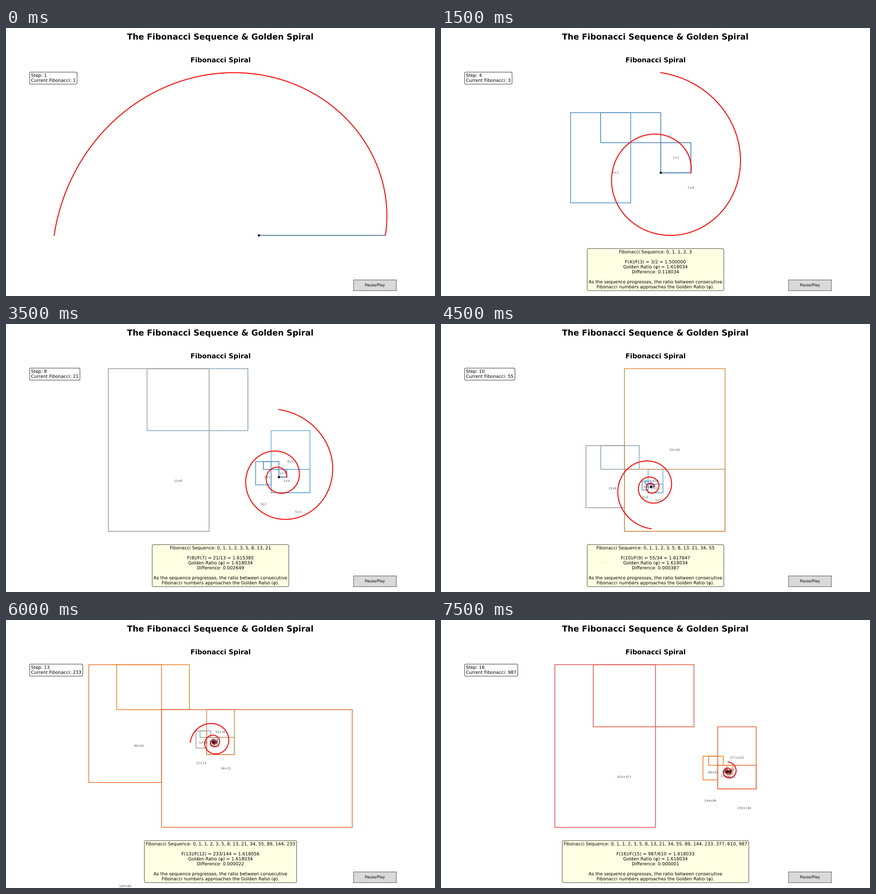
These frames come from a looping animation (947x592 px, 8000 ms). A matplotlib script:

```python
import numpy as np
import matplotlib.pyplot as plt
from matplotlib import patheffects
from matplotlib.animation import FuncAnimation
from matplotlib.colors import LinearSegmentedColormap
from matplotlib.patches import Rectangle

WIDTH, HEIGHT, DPI = 947, 592, 59.2
STEPS = 16
PHI = (1 + 5 ** 0.5) / 2

# Keep lines and glyphs at sub-pixel positions; text is filled as outlines.
plt.rcParams.update({
    "font.family": "DejaVu Sans",
    "text.hinting": "no_hinting",
    "path.snap": False,
    "path.effects": [patheffects.Normal()],
})

fib = [0, 1]
while len(fib) <= STEPS:
    fib.append(fib[-1] + fib[-2])

palette = LinearSegmentedColormap.from_list(
    "fib", ["#366b9e", "#68aede", "#f58220", "#e55050"])


def layout():
    """Corner, size and label position of every rectangle."""
    boxes = []
    x = y = 0
    for n in range(1, STEPS + 1):
        size, prev = fib[n], fib[n - 1]
        before = fib[n - 2] if n > 1 else 0
        side = n % 4
        dx, dy = prev / 2, -size / 2
        if side == 1:
            if n > 1:
                x += before
                y -= prev - before
            dx = size - prev / 2
        elif side == 2:
            dy = size / 2
        elif side == 3:
            x -= size + prev - before
            y += prev
        else:
            x -= prev - before
            y -= prev
            dy = prev - 1.5 * size
        w, h = (size, prev) if n % 2 else (prev, size)
        boxes.append((x, y, w, h, x + dx, y + dy))
    return boxes


BOXES = layout()

fig = plt.figure(figsize=(WIDTH / DPI, HEIGHT / DPI), dpi=DPI, facecolor="white")
fig.suptitle("The Fibonacci Sequence & Golden Spiral",
             fontsize=22, fontweight="bold", y=0.98)
ax = fig.add_axes([0.05, 0.1958, 0.9, 0.668])

button = fig.add_axes([0.81, 0.02, 0.1, 0.04], facecolor="0.85")
button.set(xticks=[], yticks=[])
button.text(0.5, 0.5, "Pause/Play", fontsize=10, ha="center", va="center",
            transform=button.transAxes)

step_text = fig.text(55 / WIDTH, 1 - 100.3 / HEIGHT, "", fontsize=12, va="top",
                     linespacing=1.18,
                     bbox=dict(boxstyle="round", facecolor="white"))
info_text = fig.text(0.5, 1 - 533.7 / HEIGHT, "", fontsize=12, ha="center",
                     va="center", linespacing=1.18,
                     bbox=dict(boxstyle="round", facecolor="lightyellow", alpha=0.9))


def info(step):
    a, b = fib[step], fib[step - 1]
    ratio = a / b
    return (f"Fibonacci Sequence: {', '.join(map(str, fib[:step + 1]))}\n\n"
            f"F({step})/F({step - 1}) = {a}/{b} = {ratio:.6f}\n"
            f"Golden Ratio (φ) = {PHI:.6f}\n"
            f"Difference: {abs(ratio - PHI):.6f}\n\n"
            "As the sequence progresses, the ratio between consecutive\n"
            "Fibonacci numbers approaches the Golden Ratio (φ).")


def update(frame):
    step = frame + 1
    ax.clear()
    ax.set_aspect("equal")
    ax.axis("off")
    ax.set_title("Fibonacci Spiral", fontsize=18, fontweight="bold")

    for i, (x, y, w, h, label_x, label_y) in enumerate(BOXES[:step]):
        ax.add_patch(Rectangle((x, y), w, h, fill=False, linewidth=2,
                               edgecolor=palette(i / (STEPS - 1))))
        ax.text(label_x, label_y, f"{fib[i + 1]}×{fib[i]}", fontsize=8,
                ha="center", va="center", alpha=0.7)

    # The radius grows by the golden ratio every half turn.
    theta = np.linspace(0, (step + 1) * np.pi / 2, 1000)
    r = PHI ** (theta / np.pi)
    ax.plot(r * np.cos(theta), r * np.sin(theta), color="red", linewidth=2.5)
    ax.plot(0, 0, "ko", markersize=5)

    step_text.set_text(f"Step: {step}\nCurrent Fibonacci: {fib[step]}")
    info_text.set_visible(step > 1)
    if step > 1:
        info_text.set_text(info(step))
    return []


anim = FuncAnimation(fig, update, frames=STEPS, interval=500,
                     init_func=lambda: update(0), repeat=True, repeat_delay=0)
plt.show()
```
